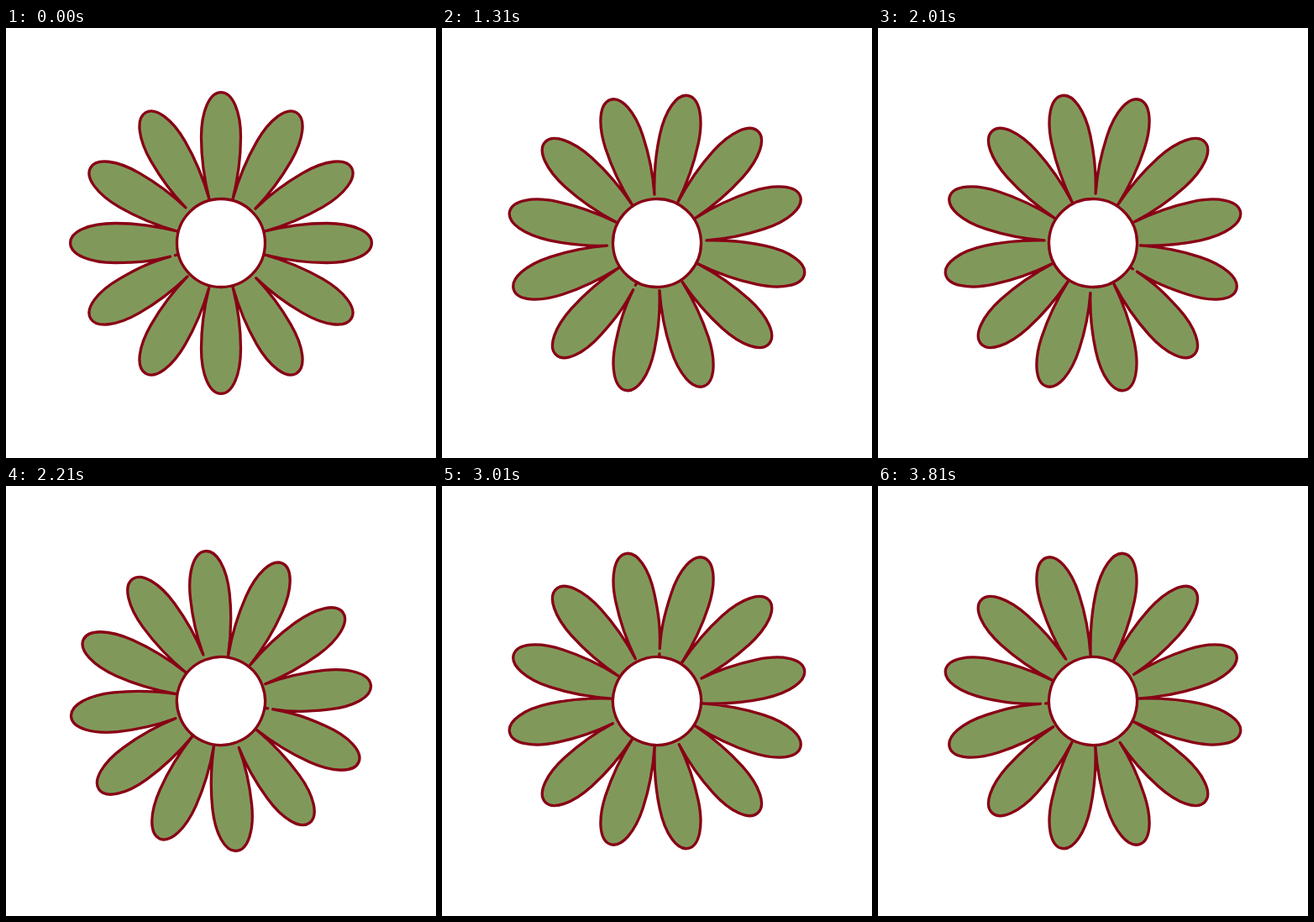
An HTML page for the animation above (3910 ms loop, 512 by 512 pixels).

```html
<!DOCTYPE html>
<html lang="en">
<head>
<meta charset="utf-8">
<title>Turning flower</title>
<style>
  html, body { margin: 0; width: 100%; height: 100%; overflow: hidden; background: #fff; }
  svg { display: block; width: 100%; height: 100%; }
</style>
</head>
<body>
<svg viewBox="0 0 512 512">
  <g id="flower" stroke="#880015" stroke-width="3.3" stroke-linecap="round" stroke-linejoin="round">
    <path id="petals" fill="#80995b"/>
    <circle cx="256" cy="256" r="52.5" fill="#fff"/>
    <path id="stub" fill="none"/>
  </g>
</svg>
<script>
const HOLD = 1010, STEP = 100, STEPS = 30, LOOP = HOLD + STEP * (STEPS - 1);
const C = 256, TIP = 179.4, WIDE = 126, HALF = 23.5;

// Radius at which neighbouring petals meet, clockwise from 15 degrees.
const meet = [54, 59, 54.5, 55.5, 56.5, 62.5, 54, 59.5, 54, 53.5, 58, 54];

const get = id => document.getElementById(id);

// Point in petal coordinates: u along the axis, v across it.
function at(axis, u, v) {
  const a = axis * Math.PI / 180, c = Math.cos(a), s = Math.sin(a);
  return (C + u * c - v * s).toFixed(2) + ' ' + (C + u * s + v * c).toFixed(2);
}

function petal(axis, r0, r1) {
  const p = (u, v) => at(axis, u, v);
  const cos = Math.cos(Math.PI / 12), sin = Math.sin(Math.PI / 12);
  const root = r => [r * cos, r * sin];
  const [u0, v0] = root(r0), [u1, v1] = root(r1);
  const side = WIDE + 0.57 * (TIP - WIDE), round = 0.59 * HALF;
  return `C${p(u0 + 24, -v0 - 6)} ${p(100, -HALF)} ${p(WIDE, -HALF)}` +
    `C${p(side, -HALF)} ${p(TIP, -round)} ${p(TIP, 0)}` +
    `C${p(TIP, round)} ${p(side, HALF)} ${p(WIDE, HALF)}` +
    `C${p(100, HALF)} ${p(u1 + 24, v1 + 6)} ${p(u1, v1)}`;
}

let d = 'M' + at(15, meet[0], 0);
meet.forEach((r, i) => { d += petal(30 + i * 30, r, meet[(i + 1) % 12]); });
get('petals').setAttribute('d', d + 'Z');
get('stub').setAttribute('d', `M${at(165, 53, 0)}L${at(165, 56.5, 0)}`);

function draw(ms) {
  const t = ms % LOOP;
  const step = t < HOLD ? 0 : 1 + Math.floor((t - HOLD) / STEP);
  get('flower').setAttribute('transform', `rotate(${-step * 360 / STEPS} ${C} ${C})`);
}

function tick() {
  draw(performance.now());
  requestAnimationFrame(tick);
}
tick();
</script>
</body>
</html>
```
